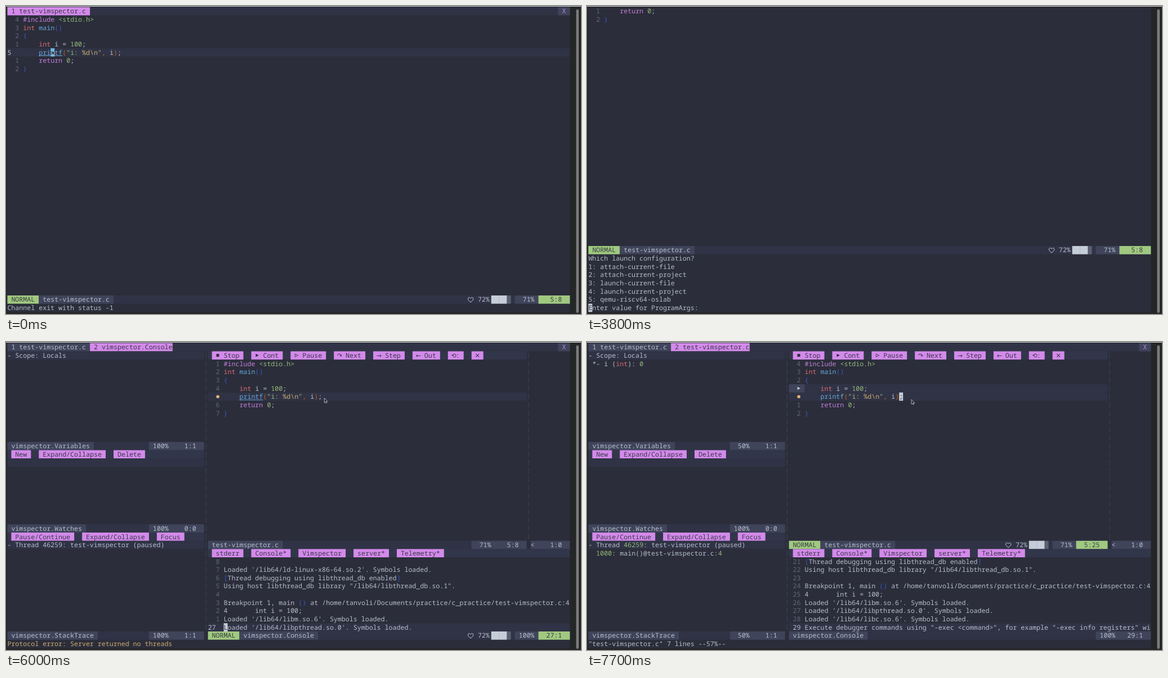
Animation of 1021 by 548 pixels, one loop 8000 ms. Source, as an HTML page:

```html
<!DOCTYPE html>
<html lang="zh-CN">
<head>
<meta charset="utf-8">
<title>Debugger session in a terminal</title>
<style>
  html, body { margin: 0; width: 100%; height: 100%; overflow: hidden; background: #242628; }
  svg { display: block; width: 1021px; height: 548px; }
  text {
    font: 11.642px "Noto Sans Mono", "DejaVu Sans Mono", monospace;
    white-space: pre;
    text-rendering: geometricPrecision;
    fill-opacity: .9;
  }
  text.icon { font: 11px "DejaVu Sans", "DejaVu Sans Mono", sans-serif; text-anchor: middle; }
  text.cjk { font: 11.642px "Noto Sans CJK SC", "Noto Sans CJK", sans-serif; text-anchor: middle; }
</style>
</head>
<body>
<svg viewBox="0 0 1021 548">
  <rect width="1021" height="548" fill="#242628"/>
  <rect width="1021" height="1" fill="#dcdddf"/>
  <rect x="2" y="1.9" width="999.3" height="543.1" fill="#2b2d3a"/>
  <rect x="1012.4" y="6" width="4.6" height="540" rx="2.3" fill="#7d7c7c"/>
  <g id="screen"></g>
  <path id="mouse" d="M0 0V8.2L1.9 6.6L3.1 9.1L4.3 8.6L3.2 6.1L5.6 5.9Z" fill="#23242c" stroke="#d0d4dc" stroke-width=".8"/>
</svg>
<script>
const CW = 6.985, RH = 14.66, X0 = 2.4, Y0 = 1.9, COLS = 143, LOOP = 8000;
const BG = '#2b2d3a', LINE = '#303345', FILL = '#32364a', SEG = '#3f445b', FG = '#c5cdd9', DIM = '#656e80',
      RED = '#ec7279', YELLOW = '#deb974', GREEN = '#a0c980', BLUE = '#6cb6eb', PURPLE = '#d38aea',
      ROYAL = '#3a5fcd', ORANGE = '#cd6600';

const screen = document.getElementById('screen');
const mouse = document.getElementById('mouse');
let out = '';

const x = c => X0 + c * CW;
const y = r => Y0 + r * RH;
const esc = s => s.replace(/&/g, '&amp;').replace(/</g, '&lt;');

function box(c0, c1, r, color, rows = 1) {
  out += `<rect x="${x(c0)}" y="${y(r)}" width="${(c1 - c0) * CW}" height="${rows * RH}" fill="${color}"/>`;
}
function put(c, r, s, color = FG) {
  out += `<text x="${x(c)}" y="${y(r) + 11.45}" fill="${color}">${esc(s)}</text>`;
}
// Pieces are [text, colour] pairs laid out one after another.
function run(c, r, pieces) {
  for (const [s, color] of pieces) {
    put(c, r, s, color);
    c += s.length;
  }
}
function glyph(c, r, s, color, cls = 'icon', cells = 1) {
  out += `<text class="${cls}" x="${x(c + cells / 2)}" y="${y(r) + 11.5}" fill="${color}">${s}</text>`;
}
function triangle(c, r, color, hollow) {
  const cx = x(c + .5), cy = y(r) + 7.2;
  out += `<path d="M${cx - 2.5} ${cy - 2.7}L${cx + 3} ${cy}L${cx - 2.5} ${cy + 2.7}Z" ` +
    `fill="${hollow ? 'none' : color}" stroke="${hollow ? color : 'none'}" stroke-width=".8"/>`;
}
function heart(c, r) {
  out += `<path transform="translate(${x(c) + 5.4} ${y(r) + 3.4})" fill="none" stroke="${FG}" ` +
    'd="M0 8.6C-3 6.2-4.7 4.6-4.7 2.5C-4.7-.5-1-.6 0 1.9C1-.6 4.7-.5 4.7 2.5C4.7 4.6 3 6.2 0 8.6Z"/>';
}
function icon(c, r, s, color) {
  if (s === '■') out += `<rect x="${x(c) + .9}" y="${y(r) + 4.7}" width="5" height="5" fill="${color}"/>`;
  else if (s === '▶' || s === '▷') triangle(c, r, color, s === '▷');
  else if (s === '●') out += `<circle cx="${x(c + .5)}" cy="${y(r) + 7.5}" r="2.8" fill="${color}"/>`;
  else glyph(c, r, s, color);
}
function cursor(c, r, ch = '', color = FG) {
  box(c, c + 1, r, color);
  put(c, r, ch, BG);
}
function divider(c, r0, r1) {
  out += `<path d="M${x(c + .5)} ${y(r0) + 2}V${y(r1)}" stroke="#3e4255" stroke-dasharray="10.66 4"/>`;
}

function tabs(second) {
  box(0, COLS, 0, LINE);
  box(0, 21, 0, second ? SEG : PURPLE);
  put(1, 0, '1 test-vimspector.c', second ? FG : BG);
  if (second) {
    box(21, 24 + second.length, 0, PURPLE);
    put(22, 0, '2 ' + second, BG);
  }
  box(140, COLS, 0, SEG);
  put(141, 0, 'X', PURPLE);
}

function buttons(c, end, r, labels) {
  box(c - 1, end, r, FILL);
  for (const label of labels) {
    const hasIcon = /^[^\x00-\x7f]/.test(label);
    box(c, c + label.length + 2, r, PURPLE);
    if (hasIcon) icon(c + 1, r, label[0], BG);
    put(c + 1 + hasIcon, r, label.slice(+hasIcon), BG);
    c += label.length + 4;
  }
}

function status(r, c, end, name, pct, pos, active) {
  box(c, end, r, LINE);
  if (active) {
    box(c, c + 8, r, GREEN);
    put(c + 1, r, 'NORMAL', BG);
    c += 8;
    heart(end - 26, r);
    put(end - 23.4, r, '72%');
    box(end - 20, end - 16, r, FG);
    box(end - 18.05, end - 17.95, r, '#aeb6c3');
    box(end - 16, end - 15, r, '#596072');
  }
  box(c, c + name.length + 2, r, SEG);
  put(c + 1, r, name);
  box(end - 14, end, r, SEG);
  if (active) box(end - 8, end, r, GREEN);
  put(end - 9 - pct.length, r, pct);
  put(end - 2 - pos.length, r, pos, active ? BG : FG);
}

const CODE = [
  [['#include ', PURPLE], ['<stdio.h>', GREEN]],
  [['int ', RED], ['main', BLUE], ['()', ROYAL]],
  [['{', ROYAL]],
  [['    int', RED], [' i = ', FG], ['100', GREEN], [';', FG]],
  [['    printf', BLUE], ['(', ORANGE], ['"i: ', GREEN], ['%d\\n', YELLOW], ['"', GREEN], [',', ORANGE],
   [' i', FG], [')', ORANGE], [';', FG]],
  [['    return ', PURPLE], ['0', GREEN], [';', FG]],
  [['}', ROYAL]]
];

function code(c, r, labels, underline) {
  const first = CODE.length - labels.length;
  [...labels].forEach((label, i) => {
    if (label === '●') icon(c - 2, r + i, label, YELLOW);
    else if (label === '▶') {
      box(c - 4, c, r + i, SEG);
      icon(c - 2, r + i, label, FG);
    } else put(c - 2, r + i, label, DIM);
    run(c, r + i, CODE[first + i]);
  });
  if (underline) {
    out += `<rect x="${x(c + 4)}" y="${y(r + 4) + 12.7}" width="${6 * CW}" height=".9" fill="${BLUE}"/>`;
  }
}

function editor() {
  tabs();
  box(0, COLS, 5, LINE);
  code(4, 1, '4321 12', true);
  put(0, 5, '5');
  cursor(11, 5, 'n', BLUE);
  status(35, 0, COLS, 'test-vimspector.c', '71%', '5:8', true);
  put(0, 36, 'Channel exit with status -1');
}

const QUESTION = 'Type number and <Enter> or click with the mouse (q or empty cancels): ';
const ARGS = 'Enter value for ProgramArgs: ';

function prompt(line, at) {
  code(4, 0, '12');
  status(29, 0, COLS, 'test-vimspector.c', '71%', '5:8', true);
  ['Which launch configuration?', '1: attach-current-file', '2: attach-current-project',
   '3: launch-current-file', '4: launch-current-project', '5: qemu-riscv64-oslab', line]
    .forEach((s, i) => put(0, 30 + i, s));
  cursor(at, 36, line[at]);
}

function panes(o) {
  const codeEnd = o.split ? 132 : COLS;
  const live = o.live, done = o.focusCode;
  tabs(done ? 'test-vimspector.c' : 'vimspector.Console');

  box(0, 50, 1, LINE);
  status(12, 0, 50, 'vimspector.Variables', done ? '50%' : '100%', o.scope ? '1:1' : '0:0');
  buttons(1, 50, 13, ['New', 'Expand/Collapse', 'Delete']);
  box(0, 50, 14, LINE);
  status(22, 0, 50, 'vimspector.Watches', '100%', '0:0');
  buttons(1, 50, 23, ['Pause/Continue', 'Expand/Collapse', 'Focus']);
  box(0, 50, 24, LINE);
  status(35, 0, 50, 'vimspector.StackTrace', done ? '50%' : '100%', live ? '1:1' : '0:0');
  divider(50, 1, 35);
  if (o.scope) put(0, 1, '- Scope: Locals');

  buttons(52, codeEnd, 1, ['■ Stop', '▶ Cont', '▷ Pause', '↷ Next', '→ Step', '← Out', '⟲:', '✕']);
  if (done) box(51, codeEnd, 5, LINE);
  box(51, codeEnd, 6, LINE);
  code(55, 2, done ? '432▶●12' : '1234●67', !done);
  status(24, 51, codeEnd, 'test-vimspector.c', '71%', done ? '5:25' : '5:8', done);
  if (o.split) {
    divider(132, 1, 24);
    box(133, COLS, 24, SEG);
    put(133, 24, '<');
    put(138, 24, live ? '1:0' : '0:0');
  }

  const star = live ? '*' : '';
  buttons(52, COLS, 25, ['stderr', 'Console' + star, 'Vimspector',
    ...(o.server ? ['server*'] : []), 'Telemetry' + star]);
  status(35, 51, COLS, 'vimspector.Console', '100%', done ? '29:1' : live ? live + ':1' : '0:0', !done);
}

function starting(o) {
  panes(o);
  box(51, COLS, 26, LINE);
  put(51, 26, '1');
  cursor(55, 26);
  box(55, 88, 17, FILL, 3);
  out += `<g fill="none" stroke="${FG}" stroke-width="1.3">` +
    '<rect x="388.4" y="256.6" width="226.6" height="33"/><rect x="391.2" y="259.4" width="221" height="27.4"/></g>';
  put(57, 18, 'Initializing debug adapter...');
  put(0, 36, '"vimspector.Console"  --');
  [...'缓冲区无内容'].forEach((ch, i) => glyph(24 + 2 * i, 36, ch, FG, 'cjk', 2));
  put(36, 36, '--');
}

const loaded = lib => [[`Loaded '/lib64/${lib}'. Symbols loaded.`, FG]];
const LOG_START = 19;
const LOG = [
  [],
  loaded('ld-linux-x86-64.so.2'),
  [['[', ROYAL], ['Thread debugging using libthread_db enabled', FG], [']', ROYAL]],
  [['Using host libthread_db library "/lib64/libthread_db.so.1".', FG]],
  [],
  [['Breakpoint 1, main ', FG], ['()', ROYAL],
   [' at /home/tanvoli/Documents/practice/c_practice/test-vimspector.c:4', FG]],
  [['4       int i = 100;', FG]],
  loaded('libm.so.6'),
  loaded('libpthread.so.0'),
  loaded('libc.so.6'),
  [['Execute debugger commands using "-exec <command>", for example "-exec info registers" wi', FG]]
];

// Nine console rows ending at log line `last`.
function log(last, relative) {
  box(51, COLS, 34, LINE);
  for (let i = 0; i < 9; i++) {
    const n = last - 8 + i, current = i === 8;
    if (!relative) put(52, 26 + i, String(n), current ? FG : DIM);
    else if (current) put(51, 34, String(n));
    else put(53, 26 + i, String(8 - i), DIM);
    run(55, 26 + i, LOG[n - LOG_START]);
  }
  if (relative) cursor(55, 34, 'L');
}

function launched(last, paused) {
  panes({ split: true, server: true, live: last, scope: paused });
  put(0, 24, paused ? '- Thread 46259: test-vimspector (paused)' : '+ Thread 46259: test-vimspector (running)');
  log(last, true);
  put(0, 36, 'Protocol error: Server returned no threads', YELLOW);
}

function stopped() {
  panes({ split: true, server: true, live: 29, scope: true, focusCode: true });
  run(1, 2, [['*- i (', FG], ['int', RED], ['): ', FG], ['0', GREEN]]);
  run(0, 24, [['- Thread ', FG], ['46259', GREEN], [': test-vimspector (paused)', FG]]);
  run(2, 25, [['1000', GREEN], [': main()@test-vimspector.c:', FG], ['4', GREEN]]);
  cursor(79, 6, ';');
  log(29, false);
  put(0, 36, '"test-vimspector.c" 7 lines --57%--');
}

const SCENES = [
  [0, editor],
  [1500, () => prompt(QUESTION, 70)],
  [2100, () => prompt(QUESTION + '3', 71)],
  [3300, () => prompt(ARGS, 29)],
  [3800, () => prompt(ARGS, 0)],
  [4100, () => starting({})],
  [4300, () => starting({ server: true })],
  [5400, () => starting({ server: true, split: true })],
  [6000, () => launched(27, true)],
  [6300, () => launched(28, false)],
  [6700, stopped]
];

// Pointer tip over time; no position means it is hidden.
const POINTER = [
  [0, 81.6, 79], [400, 82.3, 79], [1500], [4100, 82.4, 78.8], [5400, 82.6, 78.6],
  [5600, 136.4, 75.8], [6000, 565.3, 99.8], [7000, 567.2, 101.3], [7200, 576.6, 102.6], [7700, 576.2, 102.4]
];

// Last entry of a timeline that has started by time t.
function at(list, t) {
  let i = list.length - 1;
  while (list[i][0] > t) i--;
  return list[i];
}

let shown;
function update(t) {
  const scene = at(SCENES, t);
  if (scene !== shown) {
    shown = scene;
    out = '';
    scene[1]();
    screen.innerHTML = out;
  }
  const [, px, py] = at(POINTER, t);
  mouse.style.display = px === undefined ? 'none' : '';
  if (px !== undefined) mouse.setAttribute('transform', `translate(${px} ${py})`);
}

const start = performance.now();
function tick() {
  update((performance.now() - start) % LOOP);
  requestAnimationFrame(tick);
}
tick();
</script>
</body>
</html>
```
